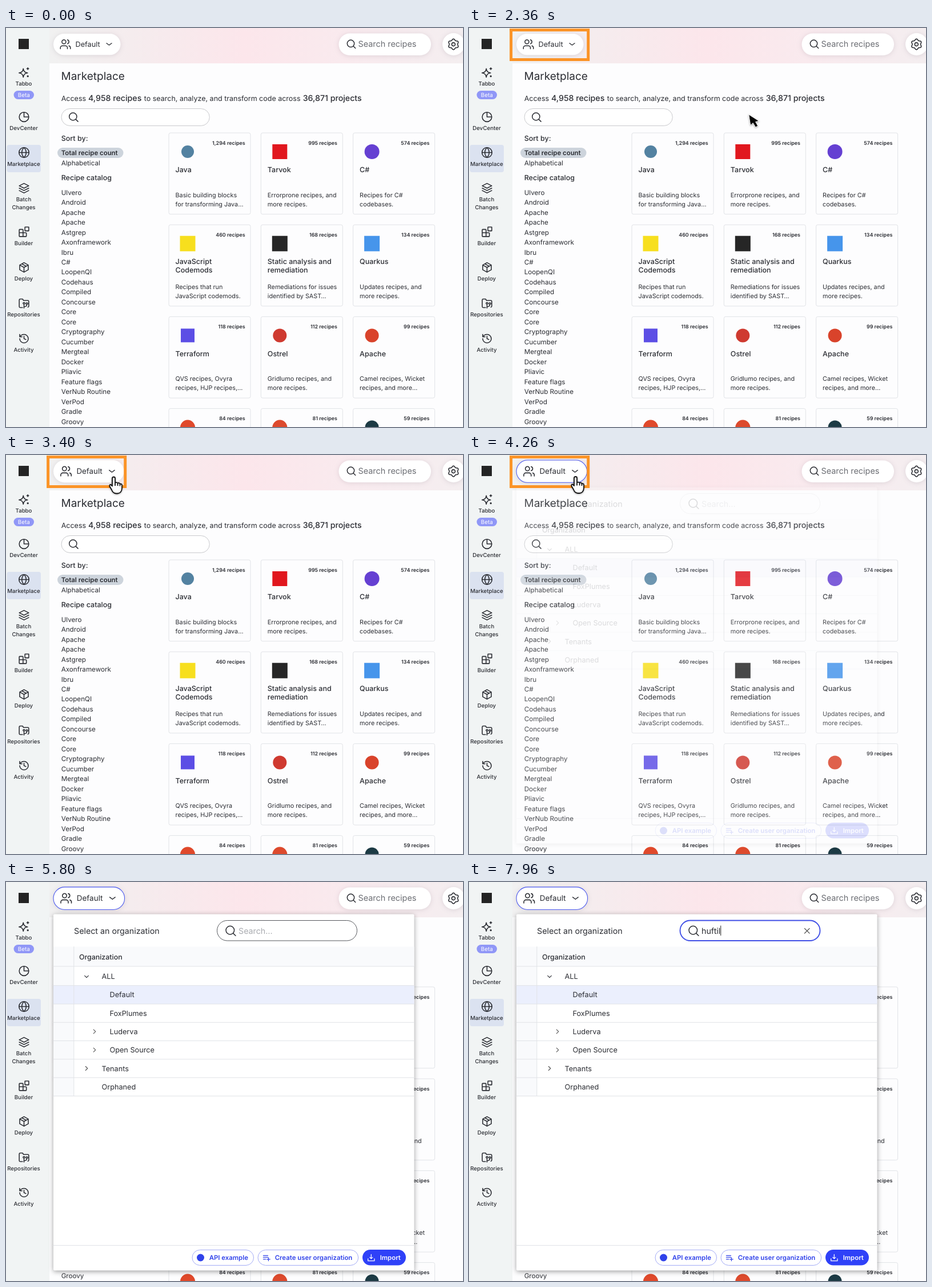
Recreate the animation shown at these times as an HTML page. Size 800 by 700 pixels, loop 8 s.

```html
<!DOCTYPE html>
<html lang="en">
<head>
<meta charset="utf-8">
<title>Marketplace</title>
<style>
  html, body { margin: 0; width: 100%; height: 100%; overflow: hidden; background: #fdfdfe; }
  svg { display: block; width: 800px; height: 700px; font-family: Inter, sans-serif; text-rendering: geometricPrecision; }
  .shadow { filter: drop-shadow(0 1px 4px rgba(60, 50, 70, .13)); }
  #popup { filter: drop-shadow(0 2px 4px rgba(0, 0, 0, .38)); }
  #cursor { filter: drop-shadow(0 1px 1.5px rgba(0, 0, 0, .35)); }
</style>
</head>
<body>
<svg id="stage" viewBox="0 0 800 700"></svg>
<script>
const INK = '#2b2d33', LINE = '#e1e3e7', BLUE = '#3042ea';
const stage = document.getElementById('stage');

const text = (x, y, size, str, { weight = 400, fill = INK, anchor = 'start' } = {}) =>
  `<text x="${x}" y="${y}" font-size="${size}" font-weight="${weight}" fill="${fill}" text-anchor="${anchor}">${str}</text>`;
const box = (x, y, w, h, r, fill, extra = '') =>
  `<rect x="${x}" y="${y}" width="${w}" height="${h}" rx="${r}" fill="${fill}" ${extra}/>`;
const disc = (x, y, r, fill) => `<circle cx="${x}" cy="${y}" r="${r}" fill="${fill}"/>`;
const line = (d, color = LINE, width = 1) =>
  `<path d="${d}" fill="none" stroke="${color}" stroke-width="${width}" stroke-linecap="round" stroke-linejoin="round"/>`;
// Icons are drawn on a 24-unit grid and centred on (x, y).
const icon = (x, y, size, d, color = INK, width = 1.9) =>
  `<g transform="translate(${x} ${y}) scale(${size / 24}) translate(-12 -12)">${line(d, color, width)}</g>`;
const ring = (x, y, r) => `M${x - r} ${y}a${r} ${r} 0 1 0 ${2 * r} 0a${r} ${r} 0 1 0 ${-2 * r} 0`;
const magnifier = (x, y, r) => line(`${ring(x, y, r)}M${x + r * .72} ${y + r * .72}l${r * .6} ${r * .6}`, INK, 1.5);
const chevronDown = (x, y, w, h, width) => line(`M${x - w / 2} ${y - h / 2}l${w / 2} ${h}l${w / 2} ${-h}`, INK, width);
const chevronRight = (x, y, r) => line(`M${x - r / 2} ${y - r}l${r} ${r}l${-r} ${r}`, '#555', 1.1);

const ICONS = {
  users: `M16 21v-2a4 4 0 0 0-4-4H6a4 4 0 0 0-4 4v2M22 21v-2a4 4 0 0 0-3-3.87M16 3.13a4 4 0 0 1 0 7.75${ring(9, 7, 4)}`,
  sparkles: `M10.500 4c1 6 3 8 9 9c-6 1-8 3-9 9c-1-6-3-8-9-9c6-1 8-3 9-9zM20 2v4M18 4h4${ring(20, 20, 1)}`,
  pie: `${ring(12, 12, 10)}M12 2v10h10`,
  globe: `${ring(12, 12, 10.5)}M1.5 12h21M12 1.5c-6 6-6 15 0 21c6-6 6-15 0-21`,
  layers: 'M12 2l10 5-10 5L2 7zM2 12l10 5 10-5M2 17l10 5 10-5',
  blocks: 'M14 2h8v8h-8zM10 22V8a1 1 0 0 0-1-1H3a1 1 0 0 0-1 1v13a1 1 0 0 0 1 1h13a1 1 0 0 0 1-1v-6a1 1 0 0 0-1-1H2',
  cube: 'M21 7v10l-9 5-9-5V7l9-5zM3 7l9 5 9-5M12 12v10M7.5 4.5l9 5',
  folder: `M9 21H4a2 2 0 0 1-2-2V5a2 2 0 0 1 2-2h5l2 3h9a2 2 0 0 1 2 2v10a2 2 0 0 1-2 2${ring(12, 12, 1.8)}${ring(18, 12.5, 1.8)}M12 14v8M12 19c4 0 6-1 6-4`,
  history: 'M3 12a9 9 0 1 0 9-9a9.75 9.75 0 0 0-6.7 2.7L3 8M3 3v5h5M12 7v5l4 2',
  listAdd: 'M3 6h13M3 11h13M3 16h7M17.500 12v9M13 16.500h9',
  download: 'M12 3v12M8 11l4 4 4-4M3 15v6h18v-6'
};

function gear(x, y) {
  const points = Array.from({ length: 72 }, (_, i) => {
    const a = i * Math.PI / 36, r = 8.3 + 1.1 * Math.cos(6 * a);
    return `${(x + r * Math.sin(a)).toFixed(2)} ${(y - r * Math.cos(a)).toFixed(2)}`;
  });
  return line(`M${points.join('L')}z${ring(x, y, 3)}`, INK, 1.6);
}

function sidebar() {
  const items = [
    ['sparkles', 78, 'Tabbo'], ['pie', 156, 'DevCenter'], ['globe', 218.5, 'Marketplace'],
    ['layers', 281, 'Batch', 'Changes'], ['blocks', 357.5, 'Builder'], ['cube', 420, 'Deploy'],
    ['folder', 483, 'Repositories'], ['history', 545, 'Activity']
  ];
  const label = (y, str) => text(31, y, 9.7, str, { weight: 500, anchor: 'middle' });
  return box(0, 0, 76, 700, 0, '#f1f4f4') + box(22, 19, 18, 18, 0, '#242424')
    + box(1.5, 205, 59.5, 48, 4, '#dbe2f0')
    + items.map(([name, y, ...words]) => icon(31.5, y, 20, ICONS[name])
      + words.map((word, i) => label(y + 23.4 + i * 13.6, word)).join('')).join('')
    + box(13.5, 110, 35.5, 15, 7.5, '#9097f7')
    + text(31.2, 121.1, 9.9, 'Beta', { fill: '#fff', anchor: 'middle' });
}

function header() {
  return box(75, 0, 725, 62, 0, 'url(#blush)')
    + `<g class="shadow">${box(582.5, 9.5, 161.5, 38.5, 19.2, '#fff')}${disc(783.5, 28.5, 19.5, '#fff')}</g>`
    + magnifier(603.5, 27.3, 6.2) + text(616.5, 33, 14.4, 'Search recipes', { fill: '#6b6d73' }) + gear(783.3, 28.6);
}

function catalog() {
  const names = ['Ulvero', 'Android', 'Apache', 'Apache', 'Astgrep', 'Axonframework', 'Ibru', 'C#', 'LoopenQI',
    'Codehaus', 'Compiled', 'Concourse', 'Core', 'Core', 'Cryptography', 'Cucumber', 'Mergteal', 'Docker',
    'Pliavic', 'Feature flags', 'VerNub Routine', 'VerPod', 'Gradle', 'Groovy'];
  return text(96.5, 90.6, 19, 'Marketplace')
    + text(96.7, 128.4, 12.5, 'Access') + text(144, 128.4, 14.2, '4,958 recipes', { weight: 500 })
    + text(241.8, 128.4, 12.5, 'to search, analyze, and transform code across')
    + text(519.7, 128.4, 14.2, '36,871 projects', { weight: 500 })
    + box(97, 141.5, 259.3, 30, 15, '#fff', 'stroke="#c9cacd"') + magnifier(117.3, 155.4, 6.6)
    + text(96.7, 198, 12.5, 'Sort by:', { weight: 500 })
    + box(90, 210, 115.5, 18, 9, '#cdd4dc') + text(96.7, 223.2, 11.4, 'Total recipe count', { weight: 600 })
    + text(96.7, 241.2, 11.65, 'Alphabetical')
    + text(96.7, 267, 12.5, 'Recipe catalog', { weight: 500 })
    + names.map((name, i) => text(96.7, 292.7 + 17.47 * i, 11.65, name)).join('');
}

function cards() {
  const square = (color, s) => box(33 - s / 2, 33 - s / 2, s, s, 0, color);
  const circle = (color, r) => disc(33, 33, r, color);
  const list = [
    ['1,294', circle('#5382a1', 11), 'Java', 'Basic building blocks|for transforming Java…'],
    ['995', square('#e1171e', 26), 'Tarvok', 'Errorprone recipes, and|more recipes.'],
    ['574', circle('#6540d2', 13), 'C#', 'Recipes for C#|codebases.'],
    ['460', square('#f7df1e', 27), 'JavaScript|Codemods', 'Recipes that run|JavaScript codemods.'],
    ['168', square('#262626', 27), 'Static analysis and|remediation', 'Remediations for issues|identified by SAST…'],
    ['134', square('#4695eb', 27), 'Quarkus', 'Updates recipes, and|more recipes.'],
    ['118', square('#5c4ee5', 24), 'Terraform', 'QVS recipes, Ovyra|recipes, HJP recipes,…'],
    ['112', circle('#cf3a30', 12), 'Ostrel', 'Gridlumo recipes, and|more recipes.'],
    ['99', circle('#d9432b', 12), 'Apache', 'Camel recipes, Wicket|recipes, and more…'],
    ['84', circle('#e0492b', 13), '', ''],
    ['81', circle('#dd4a2d', 13), '', ''],
    ['59', circle('#1c3a44', 12), '', '']
  ];
  const lines = (str, y, step, size, weight) =>
    str.split('|').map((s, i) => text(11.5, y + i * step, size, s, { weight })).join('');
  return list.map(([count, logo, title, about], i) =>
    `<g transform="translate(${285 + 161.3 * (i % 3)} ${184 + 161.2 * Math.floor(i / 3)})">`
    + box(0, 0, 143, 142.7, 3, '#fdfdfe', `stroke="${LINE}"`) + logo
    + text(133.7, 20.7, 8.9, `${count} recipes`, { weight: 600, anchor: 'end' })
    + lines(title, 69.3, 14.4, 12.5, 500) + lines(about, 112.7, 16.3, 10.8, 400) + '</g>').join('');
}

function pill() {
  return `<g id="pill"><g class="shadow">${box(83, 10, 117.5, 37.3, 18.6, '#fff', 'id="pillShape" stroke-width="1"')}</g>`
    + icon(104, 28.6, 21, ICONS.users, INK, 1.7) + text(121.5, 33.2, 12.7, 'Default')
    + chevronDown(180.5, 28.4, 9, 3.4, 1.3) + '</g>';
}

function popup() {
  const rows = [['ALL', 168, 'v'], ['Default', 182], ['FoxPlumes', 182], ['Luderva', 182, '>'],
    ['Open Source', 182, '>'], ['Tenants', 168, '>'], ['Orphaned', 168]];
  const outline = 'stroke="#a3abf6"';
  const caption = (x, str, fill = BLUE) => text(x, 663.2, 11.4, str, { weight: 600, fill });
  const tree = rows.map(([name, x, mark], i) => {
    const y = 165.5 + 32.3 * i;
    const arrow = mark === 'v' ? chevronDown(x - 27, y + .5, 6.6, 3.3, 1.1) : mark ? chevronRight(x - 27, y, 3.5) : '';
    return line(`M83 ${y + 16.2}H714.500`) + arrow + text(x - .5, y + 4.6, 12.7, name);
  }).join('');
  return `<g id="popup">${box(83, 56.5, 631.5, 625, 2, '#fff')}`
    + text(119, 90.6, 14.25, 'Select an organization')
    + box(83, 113.5, 631.5, 34.5, 0, '#f9fafc') + box(83, 148, 36, 227.5, 0, '#f9fafc')
    + box(83, 181.5, 631.5, 32.5, 0, '#ebeffd')
    + line('M83 148H714.500M118.800 113.500V375.500') + text(128, 135.6, 12.4, 'Organization', { weight: 500 }) + tree
    + box(369.5, 67.5, 245, 35.5, 17.8, '#fff', 'id="field"') + magnifier(392.3, 84.6, 7.3)
    + text(407, 90.6, 14.25, '<tspan id="query"></tspan>')
    + `<g id="hint">${text(407, 90.6, 14.25, 'Search…', { fill: '#a9abb0' })}</g>`
    + box(0, 76.5, 1, 17.5, 0, '#222', 'id="caret"')
    + `<g id="clear">${line('M587.500 81.500l8.500 8.500M596 81.500l-8.500 8.500', '#555', 1.2)}</g>`
    + line('M83 637.500H714.500')
    + box(326, 645.5, 107.5, 27, 13.5, '#fff', outline) + disc(340.5, 659, 6.5, BLUE) + caption(355.7, 'API example')
    + box(441, 645.5, 175.7, 27, 13.5, '#fff', outline) + icon(456, 659, 15, ICONS.listAdd, BLUE, 2)
    + caption(470.7, 'Create user organization')
    + box(624, 645, 76, 27.5, 13.7, '#2f41f8') + icon(639.3, 659, 15, ICONS.download, '#fff', 2)
    + caption(654.7, 'Import', '#fff') + '</g>';
}

stage.innerHTML = `<defs><linearGradient id="blush">
    <stop offset="0" stop-color="#f1f1f1"/><stop offset=".2" stop-color="#f5ecee"/>
    <stop offset=".47" stop-color="#fce6eb"/><stop offset=".72" stop-color="#f9eaee"/>
    <stop offset="1" stop-color="#f4eef0"/></linearGradient></defs>`
  + header() + sidebar() + catalog() + cards() + pill() + popup()
  + `<path id="frame" d="M71 3.500H208.700V55.500H73.600V3.500" pathLength="1" stroke-dasharray="1 2"
      fill="none" stroke="#fb9427" stroke-width="5"/>
    <g id="cursor">
      <path id="arrow" d="M0 0L3 19L7.500 15L12 22.500L16 20L12 13L18 11.500z" fill="#050505" stroke="#fff" stroke-width="1"/>
      <path id="hand" d="M-2.500 3Q-2.500 .5 0 .5Q2.500 .5 2.500 3V11Q5 9 7 11.500Q9.500 10 11 12.700Q14.500 12 14.500 15.500V20Q14 29 7 29.500H4Q-1.500 29 -3.500 23L-7 17Q-7.500 13.500 -5 14L-2.500 16.500z
        M2.500 11V16M7 11.500V16M11 12.700V16.500" fill="#fff" stroke="#111" stroke-width="1.800" stroke-linejoin="round"/>
    </g>`;

const part = Object.fromEntries([...stage.querySelectorAll('[id]')].map(el => [el.id, el]));
const show = (el, on) => el.setAttribute('visibility', on ? 'visible' : 'hidden');
const between = (t, a, b) => t >= a && t < b;

// Linear interpolation through rows of [time, ...values].
function track(t, rows) {
  const next = rows.findIndex(row => row[0] > t);
  if (next === 0) return rows[0].slice(1);
  if (next < 0) return rows[rows.length - 1].slice(1);
  const [a, b] = [rows[next - 1], rows[next]], k = (t - a[0]) / (b[0] - a[0]);
  return a.slice(1).map((v, i) => v + (b[i + 1] - v) * k);
}

const DURATION = 8000;
const POINTER = [[1985, 806, 310], [2120, 712, 256], [2240, 608, 204], [2360, 491, 152], [2460, 360, 118],
  [2570, 238, 92], [2720, 212, 68], [2900, 200, 53], [3150, 193, 42], [3400, 188.5, 38], [4000, 186.5, 37.5],
  [5120, 186.5, 37.5], [5300, 210, 54], [5460, 262, 78], [5620, 318, 87], [5780, 372, 91]];
const FRAME_DRAW = [[915, 1], [1879, 0]];
const FRAME_FADE = [[4660, 1], [5060, .66], [5460, 0]];
const PILL_SCALE = [[3150, 1], [3400, 1.05], [4240, 1.05], [4430, 1.06]];
const POPUP_FADE = [[4230, 0], [4430, 1]];
const WORD = 'huftil', KEY_TIMES = [7360, 7460, 7560, 7730, 7900, 7960];

function render(t) {
  part.frame.setAttribute('stroke-dashoffset', track(t, FRAME_DRAW)[0]);
  part.frame.setAttribute('opacity', track(t, FRAME_FADE)[0]);
  show(part.frame, t >= 925);

  const scale = track(t, PILL_SCALE)[0];
  part.pill.setAttribute('transform', `translate(83 28.6) scale(${scale}) translate(-83 -28.6)`);
  part.pillShape.setAttribute('stroke', t >= 4260 ? '#4a58ee' : 'none');

  const [x, y] = track(t, POINTER), pointing = between(t, 3100, 5290), visible = between(t, 1985, 5775);
  part.cursor.setAttribute('transform', `translate(${x} ${y})`);
  show(part.arrow, visible && !pointing);
  show(part.hand, visible && pointing);

  const focused = t >= 6200, typed = WORD.slice(0, KEY_TIMES.filter(k => k <= t).length);
  part.popup.style.opacity = track(t, POPUP_FADE)[0];
  part.field.setAttribute('stroke', focused ? '#4150e6' : t >= 5770 ? '#55575c' : '#c6c7cb');
  part.field.setAttribute('stroke-width', focused ? 1.9 : 1);
  part.query.textContent = typed;
  show(part.hint, !typed);
  show(part.clear, typed);
  show(part.caret, focused && !between(t, 6660, 7160));
  part.caret.setAttribute('x', 407 + (typed ? part.query.getComputedTextLength() : 0));
}

const start = performance.now();
function tick() {
  render((performance.now() - start) % DURATION);
  requestAnimationFrame(tick);
}
tick();
</script>
</body>
</html>
```
